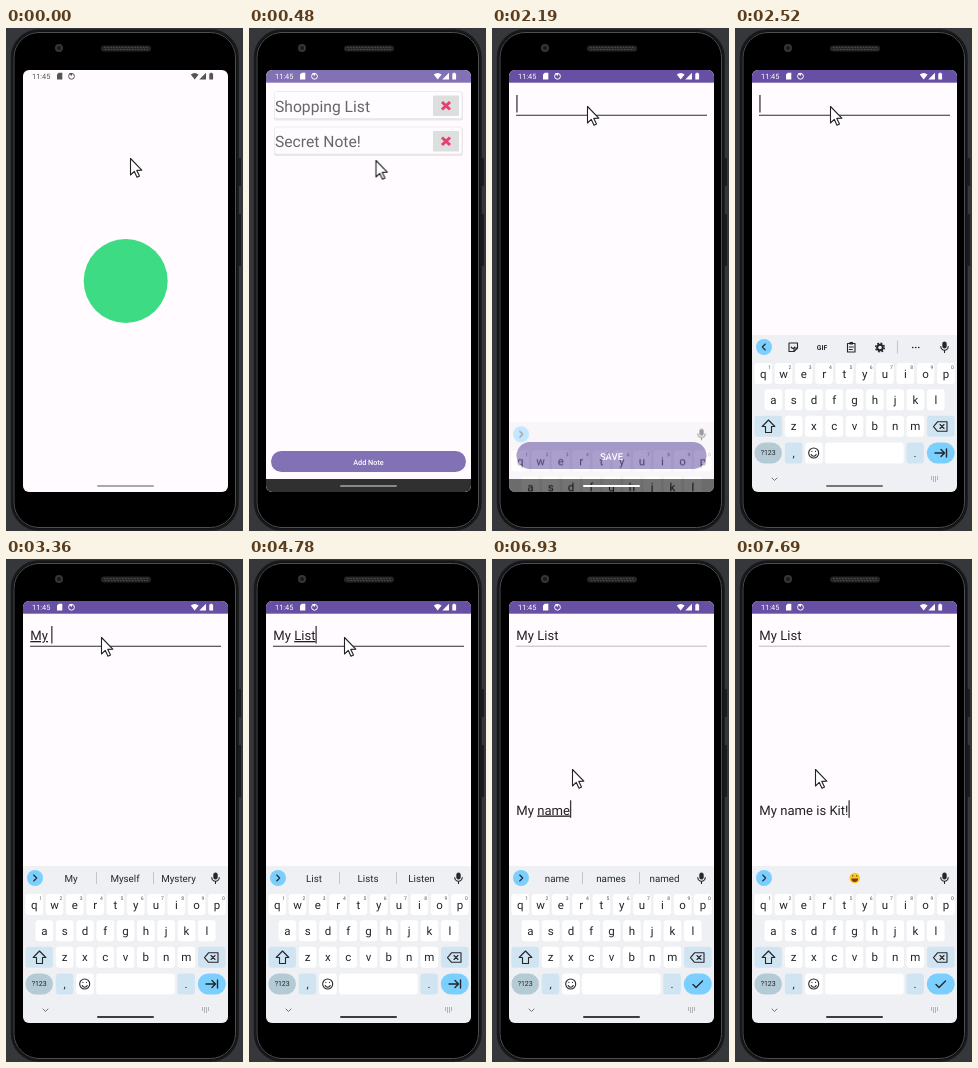
An HTML page that plays this animation: 237x503 px, repeating every 8 s.

```html
<!DOCTYPE html>
<html lang="en">
<head>
<meta charset="utf-8">
<title>Notes app demo</title>
<style>
  html, body { margin: 0; width: 100%; height: 100%; overflow: hidden; background: #36373b; }
  svg { display: block; width: 237px; height: 503px; }
  text { font-family: Roboto, Arial, sans-serif; white-space: pre; text-rendering: geometricPrecision; }
  .mid { text-anchor: middle; }
  .line { fill: none; stroke: #242629; stroke-width: 1.1; stroke-linecap: round; stroke-linejoin: round; }
  .word { text-decoration: underline; }
  .field { font-size: 13.1px; fill: #222; }
  .cursor, .splash, .list, .edit, .ripple, .board, .handle, .status { animation: 8s linear infinite; }
  .cursor { animation-name: cursor; }
  .splash { animation-name: splash; }
  .list { animation-name: list; }
  .edit { animation-name: edit; }
  .ripple { animation-name: ripple; transform-origin: 119.5px 434px; }
  .board { animation-name: board; }
  .handle { animation-name: handle; animation-timing-function: step-end; }
  .status { animation-name: status; animation-timing-function: step-end; }

  @keyframes cursor {
    0%, 1.49% { transform: translate(124px, 130px); }
    1.5%, 8.6% { transform: translate(126.5px, 132px); }
    18.4%, 19.4% { transform: translate(105px, 430px); }
    20.25% { transform: translate(110px, 374px); }
    25.5%, 64.2% { transform: translate(95px, 78px); }
    68.4%, 70.24% { transform: translate(81px, 211px); }
    70.25%, 100% { transform: translate(80px, 210px); }
  }
  @keyframes splash { 0%, 3.3% { opacity: 1; } 4.8%, 100% { opacity: 0; } }
  @keyframes list { 0%, 3% { opacity: 0; } 6.7%, 100% { opacity: 1; } }
  @keyframes edit { 0%, 23% { opacity: 0; } 25.5%, 100% { opacity: 1; } }
  @keyframes ripple {
    0%, 19.4% { opacity: 0; transform: scaleX(.3); }
    20.25% { opacity: .13; transform: scaleX(1); }
    23%, 100% { opacity: 0; transform: scaleX(3); }
  }
  @keyframes board {
    0%, 25.8% { opacity: 0; transform: translateY(157px); }
    27.375% { opacity: .45; transform: translateY(88px); }
    28.875%, 100% { opacity: 1; transform: none; }
  }
  @keyframes handle { 0% { fill: #aaa; } 5% { fill: #8a8a8a; } 8.6% { fill: #fff; } 29% { fill: #777; } 32.2%, 100% { fill: #3c3d40; } }
  @keyframes status { 0% { color: #555; } 4.1%, 100% { color: #fff; } }
</style>
</head>
<body>
<svg viewBox="0 0 237 503">
  <defs>
    <clipPath id="screen"><rect x="17" y="42" width="205" height="422" rx="6"/></clipPath>
    <clipPath id="pill"><rect x="22" y="423" width="195" height="21" rx="10.5"/></clipPath>
    <g id="card">
      <rect x="25" y="64" width="189" height="28.5" rx="2" fill="#e3e0e5"/>
      <rect x="25.5" y="63.5" width="187.5" height="27" rx="2" fill="#fffcff" stroke="#e6e3e8" stroke-width=".8"/>
      <rect x="184" y="67.5" width="26" height="20.5" rx="1" fill="#d6d7d7"/>
      <path d="M193 74l8 7.500m0-7.500l-8 7.500" stroke="#e0134f" stroke-width="3"/>
    </g>
  </defs>

  <!-- phone -->
  <rect width="237" height="503" fill="#36373b"/>
  <path d="M233.500 130v28M233.500 186v52" stroke="#1b1c1e" stroke-width="3"/>
  <rect x="6" y="2.500" width="225.500" height="499" rx="27" fill="#000" stroke="#17181a" stroke-width="2.500"/>
  <rect x="8" y="4.500" width="221.500" height="495" rx="25" fill="#000" stroke="#4d4f52"/>
  <circle cx="53" cy="20" r="4" fill="#34363a"/>
  <circle cx="53" cy="20" r="2" fill="#18191c"/>
  <rect x="95" y="17.500" width="50" height="6" rx="3" fill="#242527"/>
  <path d="M98 19.500h45M99 21.500h43" stroke="#4b4c4e" stroke-dasharray="1.500 1.500"/>

  <g clip-path="url(#screen)">
    <rect x="17" y="42" width="205" height="422" fill="#fffbfe"/>
    <circle class="splash" cx="119.700" cy="253" r="42" fill="#3ddc84"/>

    <g class="list">
      <rect x="17" y="42" width="205" height="422" fill="#fffbfe"/>
      <rect x="17" y="42" width="205" height="12.700" fill="#6750a4"/>
      <rect x="17" y="451" width="205" height="13" fill="#000"/>
      <use href="#card"/>
      <use href="#card" y="35.500"/>
      <g font-size="15.660" fill="#444">
        <text x="26" y="84">Shopping List</text>
        <text x="26" y="119.300">Secret Note!</text>
      </g>
      <rect x="22" y="423" width="195" height="21" rx="10.500" fill="#6750a4"/>
      <g clip-path="url(#pill)"><ellipse class="ripple" cx="119.500" cy="434" rx="32" ry="15" fill="#fff"/></g>
      <text class="mid" x="119.500" y="436.500" font-size="7.300" font-weight="500" fill="#fff">Add Note</text>
    </g>

    <g class="edit">
      <rect x="17" y="42" width="205" height="422" fill="#fffbfe"/>
      <rect x="17" y="42" width="205" height="12.700" fill="#6750a4"/>
      <rect x="17" y="451" width="205" height="13" fill="#000"/>
      <rect id="rule" x="24" y="86.700" width="191"/>
      <text class="field" x="24.300" y="81"><tspan></tspan><tspan class="word"></tspan><tspan></tspan></text>
      <text class="field" x="24.300" y="255.500"><tspan></tspan><tspan class="word"></tspan><tspan></tspan></text>
      <rect id="caret" width="1.300" height="17.500" fill="#3b3644"/>
      <rect x="24.500" y="414" width="190" height="27" rx="13.500" fill="#6750a4"/>
      <text class="mid" x="119.500" y="431.500" font-size="9.500" font-weight="500" fill="#fff">SAVE</text>
    </g>

    <g class="board">
      <rect x="17" y="307" width="205" height="158" fill="#eff0f3"/>
      <g id="keys"></g>
      <circle cx="29" cy="319" r="8" fill="#7acfff"/>
      <path id="chevron" class="line"/>
      <g class="line">
        <rect x="207.900" y="314" width="3.200" height="6" rx="1.600" fill="#242629"/>
        <path d="M205.800 318.500a3.700 3.700 0 0 0 7.400 0M209.500 322.500v2"/>
      </g>

      <g id="tools" class="line">
        <path d="M54 315h8.500v5l-3.500 3.500h-5zM62.500 320h-3.500v3.500M56.200 319a1.800 1.800 0 0 0 3.500 0"/>
        <path d="M112.500 315.500h7.500v8.500h-7.500zM115 314.500h2.500v1.500h-2.500zM114.300 319h4M114.300 321.500h3"/>
        <circle cx="145" cy="319.500" r="2.800" stroke-width="2"/>
        <circle cx="145" cy="319.500" r="4.300" stroke-dasharray="1.800 1.577" stroke-linecap="butt" stroke-width="1.500"/>
        <path d="M162.500 313v12" stroke="#c4c6c9"/>
        <path d="M177.700 319.500h.1M180.700 319.500h.1M183.700 319.500h.1" stroke-width="1.600"/>
        <text class="mid" x="87" y="321.800" font-size="6.800" font-weight="700" fill="#242629" stroke="none">GIF</text>
      </g>

      <g id="words" font-size="9.800" fill="#26282b">
        <path d="M90.500 313v12M147.500 313v12" stroke="#c4c6c9"/>
        <text class="mid" x="65" y="322.700"></text>
        <text class="mid" x="119" y="322.700"></text>
        <text class="mid" x="172.500" y="322.700"></text>
      </g>

      <g id="emoji">
        <circle cx="119.700" cy="319" r="5.300" fill="#fcc52c"/>
        <path d="M116.300 319.500h6.800a3.400 3.400 0 0 1-6.800 0z" fill="#7a3a1d"/>
        <path d="M117.700 316.200v1.300M121.700 316.200v1.300" stroke="#4d3014" stroke-width="1.100"/>
      </g>

      <g class="line">
        <path d="M33.500 392l-6.300 6.500h3.300v6h6v-6h3.300z"/>
        <path d="M202.500 393.800h9.500v9.500h-9.500l-4-4.750zM205 396.500l4 4m0-4l-4 4"/>
        <circle cx="78.700" cy="425" r="5"/>
        <path d="M76.200 426.500a2.700 2.700 0 0 0 5 0M76.900 423.300v.2M80.500 423.300v.2"/>
        <path id="next" d="M200 425h9M206 421.500l3.500 3.500-3.500 3.500M211.500 421v8" stroke-width="1.400"/>
        <path id="done" d="M201 425.500l3 3 6.500-6.500" stroke-width="1.400"/>
        <path d="M37 450l2.500 2.500 2.500-2.500" stroke="#666" stroke-width=".9"/>
        <path d="M196 449h8M196 451h8M198 453h4" stroke="#777" stroke-dasharray="1 1" stroke-linecap="butt"/>
      </g>
    </g>

    <g class="status" fill="currentColor">
      <text x="26" y="50.900" font-size="7.400">11:45</text>
      <path d="M52.800 44.800h3.500v6.700h-5.300v-4.900z"/>
      <circle cx="65.500" cy="48.300" r="2.900" fill="none" stroke="currentColor"/>
      <path d="M65.500 48.300l-2.500-3.300h3.500z"/>
      <path d="M184.800 46.500q3.900-3.200 7.800 0l-3.900 5zM200 44.800v6.700h-6.700zM203.300 45.500h1v-.8h1.800v.8h1v6h-3.800z"/>
    </g>
    <rect class="handle" x="91" y="457" width="57" height="2" rx="1"/>
  </g>

  <path class="cursor" d="M.5.500v16.500l3.800-3.600 2.700 5.800 2.500-1.100-2.700-5.700 5-.2z" fill="#fff" stroke="#222" stroke-width="1.100" stroke-linejoin="round"/>
</svg>

<script>
const LOOP = 8000;
const $ = id => document.getElementById(id);
const fields = [...document.querySelectorAll('.field')];
const slots = [...document.querySelectorAll('#words text')];

// Keyboard
const PALE = '#d0e5f1';
function key(x, y, w, label = '', fill = '#fff', size = 11.5, r = 3) {
  return `<rect x="${x - w / 2}" y="${y - 10.5}" width="${w}" height="21" rx="${r}" fill="${fill}"/>` +
    `<text class="mid" x="${x}" y="${y + size * .35}" font-size="${size}" fill="#222428">${label}</text>`;
}
function row(letters, x, y) {
  return [...letters].map((c, i) => key(x + i * 20.3, y, 17.6, c)).join('');
}
const hints = [...'1234567890'].map((d, i) =>
  `<text class="mid" x="${34.6 + i * 20.3}" y="341" font-size="5" fill="#555">${d}</text>`).join('');
$('keys').innerHTML =
  row('qwertyuiop', 28.2, 345.5) + hints +
  row('asdfghjkl', 38.4, 371.7) +
  row('zxcvbnm', 58.6, 398.3) +
  key(33.2, 398.3, 27.5, '', PALE) + key(205.8, 398.3, 27.5, '', PALE) +
  key(33.2, 425, 27.5, '?123', '#b4cad5', 7, 10.5) +
  key(58.6, 425, 17.6, ',', PALE) + key(78.9, 425, 17.6) +
  key(129.4, 425, 78.5) + key(180.1, 425, 17.6, '.', PALE) +
  key(205.8, 425, 28, '', '#7acfff', 7, 10.5);

// [time, field, text with _composing_ word, suggestion bar]
const steps = [
  [0, 0, '', ''],
  [2370, 0, '', 'tools'],
  [3060, 0, '_M_', 'tools'],
  [3120, 0, '_M_', 'M|My|Me'],
  [3300, 0, '_My_', 'My|Myself|Mystery'],
  [3360, 0, '_My_ ', 'My|Myself|Mystery'],
  [3570, 0, 'My ', 'name|phone|mother'],
  [4050, 0, 'My _L_', 'L|Love|Life'],
  [4170, 0, 'My _Li_', 'Li|Life|Little'],
  [4510, 0, 'My _Lis_', 'Lis|List|Listen'],
  [4780, 0, 'My _List_', 'List|Lists|Listen'],
  [4990, 0, 'My List', 'of|is|for'],
  [5410, 1, '', 'tools'],
  [6210, 1, '_M_', 'tools'],
  [6300, 1, '_M_', 'M|My|Me'],
  [6450, 1, '_My_', 'My|Myself|Mystery'],
  [6600, 1, 'My ', 'name|phone|mother'],
  [6690, 1, 'My _n_', 'n|name|new'],
  [6750, 1, 'My _na_', 'na|name|nap'],
  [6840, 1, 'My _nam_', 'nam|name|named'],
  [6900, 1, 'My _name_', 'name|names|named'],
  [6990, 1, 'My name _i_', 'I|is|in'],
  [7210, 1, 'My name is ', 'the|a|not'],
  [7270, 1, 'My name is _K_', 'K|Keep|Know'],
  [7330, 1, 'My name is _Ki_', 'Ki|Kind|Kids'],
  [7480, 1, 'My name is _Kit_!', 'Kit|Kite|Kits'],
  [7690, 1, 'My name is Kit!', 'emoji']
];

const show = (el, on) => el.style.display = on ? '' : 'none';

function attrs(el, values) {
  for (const name in values) el.setAttribute(name, values[name]);
}

function write(field, text) {
  const parts = text.split('_');
  [...field.children].forEach((span, i) => span.textContent = parts[i] || '');
}

function apply([, active, text, bar]) {
  write(fields[0], active ? 'My List' : text);
  write(fields[1], active ? text : '');
  const width = text ? fields[active].getComputedTextLength() : 0;
  attrs($('caret'), { x: 24.3 + width, y: active ? 241.3 : 67 });
  attrs($('rule'), active ? { height: .9, fill: '#b5b3b8' } : { height: 1.2, fill: '#504d55' });
  show($('next'), !active);
  show($('done'), active);

  const words = bar.includes('|');
  show($('tools'), bar === 'tools');
  show($('emoji'), bar === 'emoji');
  show($('words'), words);
  if (words) bar.split('|').forEach((w, i) => slots[i].textContent = w);
  attrs($('chevron'), { d: bar === 'tools' ? 'M30.300 316l-3 3 3 3' : 'M27.700 316l3 3-3 3' });
}

let start, current;
function frame(now) {
  start ??= now;
  const t = (now - start) % LOOP;
  const step = steps.findLast(s => s[0] <= t);
  if (step !== current) apply(current = step);
  show($('caret'), !(t >= 2550 && t < 3060 || t >= 5930 && t < 6210));
  requestAnimationFrame(frame);
}
apply(steps[0]);
requestAnimationFrame(frame);
</script>
</body>
</html>
```
